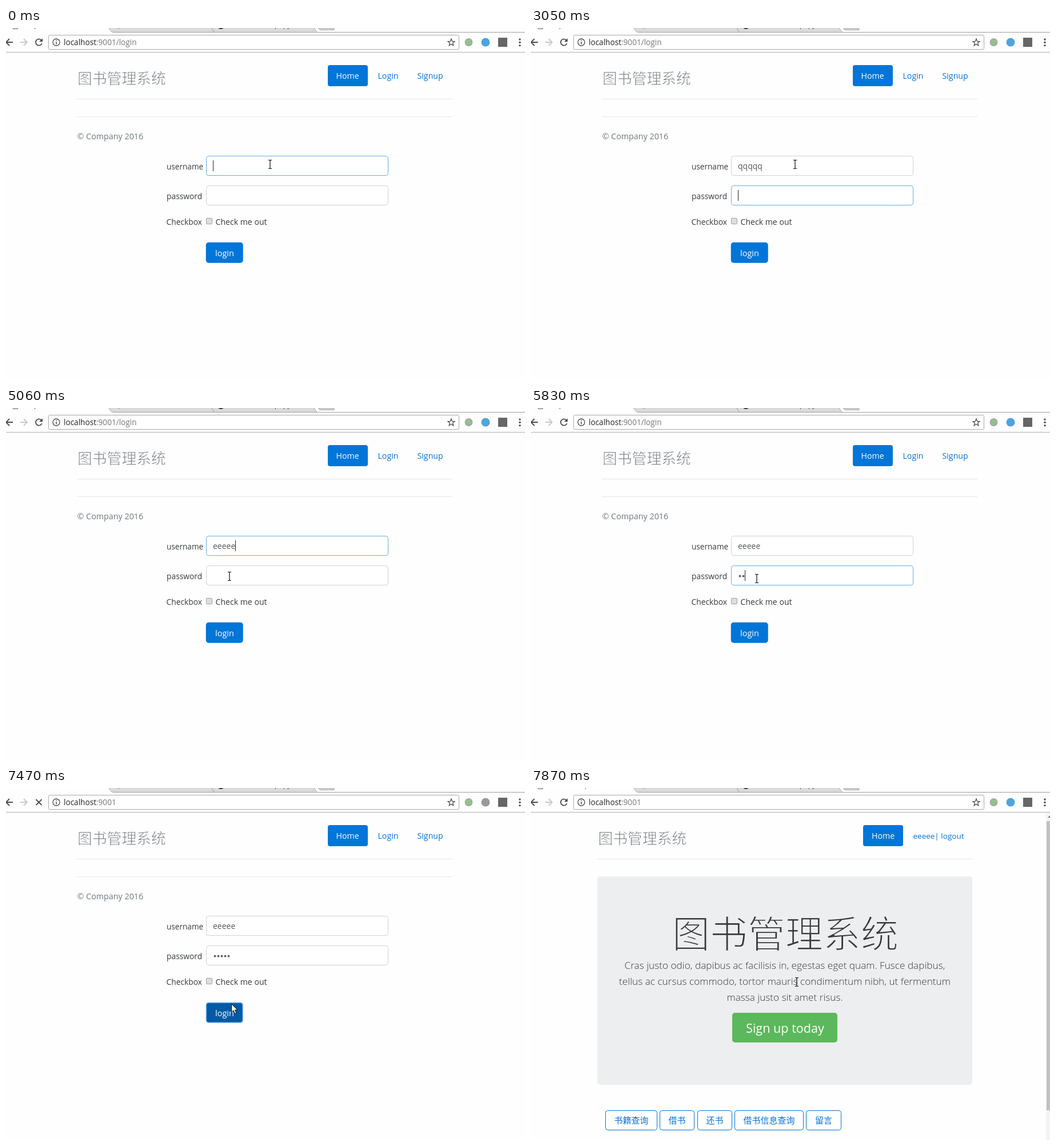
Animation of 908 by 617 pixels, one loop 8000 ms. Source, as an HTML page:

```html
<!DOCTYPE html>
<html lang="zh">
<head>
<meta charset="utf-8">
<style>
  html, body { margin: 0; width: 100%; height: 100%; overflow: hidden; background: #fefefe; }
  svg { display: block; font-family: "Open Sans", "Noto Sans", sans-serif; font-size: 13.8px; }
  .cjk { font-family: "Noto Sans CJK SC", "Noto Sans CJK", sans-serif; }
  /* an outline in the background colour thins the strokes */
  .brand { font-size: 25.8px; fill: #777f86; stroke: #fefefe; stroke-width: .7; }
  .title { font-size: 66px; stroke: #eceeef; stroke-width: 2.2; }
  .ink { fill: #373a3c; }
  .blue { fill: #0275d8; }
  .white { fill: #fff; }
  .mid { text-anchor: middle; }
  .lead { font-size: 17.2px; font-weight: 300; }
  .nav { font-size: 14.2px; }
  .field { fill: #fff; stroke: #d2d2d2; }
  .field.on { stroke: #66afe9; }
  .value { font-size: 14px; fill: #55595c; }
  .icon { fill: none; stroke: #4b4b4b; stroke-width: 1.8; }
  .rule { stroke: #e5e5e5; }
</style>
</head>
<body>
<svg width="908" height="617" viewBox="0 0 908 617">
  <!-- browser tabs -->
  <path d="M180 0L186 7.5H543L539 0Z" fill="#dadada"/>
  <path d="M180 0Q183 7.5 188 7.5H908M360 0L364 7M539 0L544 7" fill="none" stroke="#a0a0a0"/>
  <path d="M546 0L549 3.5H574V0Z" fill="#d0d0d0" stroke="#aaa"/>
  <path id="favicon" d="M12.5 0V1.5H20.5V0" fill="none" stroke="#666"/>
  <circle cx="198" cy="-4" r="5" fill="#62b5e5"/>
  <circle cx="376" cy="-4" r="6" fill="#333"/>
  <g font-size="12" fill="#555">
    <text id="tabText" y="-1">p</text>
    <text x="470" y="-1">p</text><text x="485" y="-1">py</text>
  </g>

  <!-- toolbar -->
  <path d="M0 42.5H908" stroke="#b0b0b0"/>
  <path class="icon" d="M12 25H0M6 19L0 25L6 31"/>
  <path class="icon" d="M25 25H37M31 19L37 25L31 31" style="stroke:#c8c8c8"/>
  <g id="reload">
    <path class="icon" d="M61.5 21A5.6 5.6 0 1 0 62.8 27"/>
    <path d="M64 18V24H58Z" fill="#4b4b4b"/>
  </g>
  <path id="stop" class="icon" d="M52.5 20L62.5 30M62.5 20L52.5 30"/>
  <rect x="74.5" y="12.5" width="718" height="25" rx="2" fill="#fff" stroke="#a9a9a9"/>
  <circle cx="88" cy="25" r="6" class="icon" style="stroke-width:1.3"/>
  <path d="M88 24V28.5M88 21V22.6" stroke="#4b4b4b" stroke-width="1.5"/>
  <text x="101" y="29.5" font-size="13.6" fill="#222">localhost<tspan id="path" fill="#777"></tspan></text>
  <path class="icon" style="stroke-width:1.3" d="M779 19L780.7 23.3L785 23.5L781.6 26.3L782.8 30.7L779 28.2L775.2 30.7L776.4 26.3L773 23.5L777.3 23.3Z"/>
  <circle cx="809.5" cy="25" r="6" fill="#8fc48a" stroke="#a5a5a5" stroke-width="1.8"/>
  <circle id="ext" cx="839" cy="25" r="7.5"/>
  <rect x="861" y="17" width="16" height="16" fill="#666"/>
  <g fill="#4b4b4b"><circle cx="899" cy="20" r="1.7"/><circle cx="899" cy="25.3" r="1.7"/><circle cx="899" cy="30.6" r="1.7"/></g>

  <g id="login">
    <text class="cjk brand" x="125" y="98">图书管理系统</text>
    <rect class="blue" x="563" y="65" width="70" height="37" rx="4"/>
    <g class="nav">
      <text class="white" x="577.5" y="89">Home</text>
      <text class="blue" x="650.5" y="89">Login</text>
      <text class="blue" x="719.5" y="89">Signup</text>
    </g>
    <path class="rule" d="M124 124.5H781M124 155.5H781"/>
    <text x="124.5" y="195" font-size="14.3" fill="#6f767b">© Company 2016</text>
    <g class="ink">
      <text x="281" y="248" font-size="13.6">username</text>
      <text x="281" y="300">password</text>
      <text x="280.5" y="345">Checkbox</text>
      <text x="366.5" y="345" font-size="14.1">Check me out</text>
    </g>
    <rect id="user" class="field" x="350.5" y="224.5" width="318" height="34" rx="4"/>
    <rect id="pass" class="field" x="350.5" y="276.5" width="318" height="34" rx="4"/>
    <rect id="mark" x="362" y="232" width="44" height="19" fill="#3390ff"/>
    <text id="name" class="value" x="362" y="247"></text>
    <g id="dots" fill="#55595c"></g>
    <rect id="caret" width="1" height="19" fill="#222"/>
    <rect x="350.5" y="333.5" width="10" height="10" rx="1.5" fill="#dedede" stroke="#a0a0a0"/>
    <rect id="button" x="350.5" y="376.5" width="63.5" height="34.5" rx="4" stroke-width="1.5"/>
    <text class="white" x="366" y="400" font-size="14.5">login</text>
  </g>

  <g id="home">
    <path d="M901 43H908V617H901Z" fill="#f3f3f3"/>
    <path d="M902 58H908V565H902Z" fill="#c1c1c1"/>
    <path d="M904 52L908 48V52Z" fill="#777"/>
    <text class="cjk brand" x="117.5" y="98">图书管理系统</text>
    <rect class="blue" x="581" y="65" width="70" height="37" rx="4"/>
    <text class="white nav" x="596" y="89">Home</text>
    <text class="blue" x="668.5" y="89" font-size="13.5">eeeee| logout</text>
    <path class="rule" d="M116 124.5H772"/>
    <rect x="116" y="155" width="656" height="365" rx="5" fill="#eceeef"/>
    <text class="cjk title ink mid" x="445" y="280">图书管理系统</text>
    <g class="lead ink mid">
      <text x="444" y="317">Cras justo odio, dapibus ac facilisis in, egestas eget quam. Fusce dapibus,</text>
      <text x="444" y="345">tellus ac cursus commodo, tortor mauris condimentum nibh, ut fermentum</text>
      <text x="444" y="373">massa justo sit amet risus.</text>
    </g>
    <rect x="352" y="394" width="184" height="52" rx="5" fill="#5cb85c"/>
    <text class="white mid" x="444.5" y="429" font-size="21.6">Sign up today</text>
    <g id="links"></g>
  </g>

  <path id="beam" d="M-3 -7.5H-1L0 -6.5L1 -7.5H3M0 -6.5V6.5M-3 7.5H-1L0 6.5L1 7.5H3" fill="none" stroke="#111" stroke-width="1.2"/>
  <path id="arrow" d="M.5 .5V15L4 11.8L6.5 17.5L9 16.4L6.5 11H11Z" fill="#fff" stroke="#111"/>
</svg>
<script>
const $ = id => document.getElementById(id);
const LOOP = 8000, HOVER = 7180, SUBMIT = 7470, HOME = 7600, LOADED = 7750;

// [time, username, dots, focused field, caret: 1 shown, 0 hidden, 2 text selected]
const typing = [
  [0, '', 0, 'user', 1], [400, 'q', 0, 'user', 1], [560, 'qq', 0, 'user', 1],
  [830, 'qqq', 0, 'user', 1], [1110, 'qqqq', 0, 'user', 1], [1640, 'qqqq', 0, 'user', 0],
  [1790, 'qqqqq', 0, 'user', 1], [2070, 'qqqqq', 0, 'pass', 1], [2620, 'qqqqq', 0, 'pass', 0],
  [3050, 'qqqqq', 0, 'pass', 1], [3610, 'qqqqq', 0, 'user', 1], [3730, 'qqqqq', 0, 'user', 2],
  [4130, 'e', 0, 'user', 1], [4400, 'ee', 0, 'user', 1], [4550, 'eee', 0, 'user', 1],
  [4820, 'eeee', 0, 'user', 1], [5060, 'eeeee', 0, 'user', 1], [5370, 'eeeee', 0, 'pass', 1],
  [5680, 'eeeee', 1, 'pass', 1], [5830, 'eeeee', 2, 'pass', 1], [6070, 'eeeee', 3, 'pass', 1],
  [6220, 'eeeee', 4, 'pass', 1], [6750, 'eeeee', 4, 'pass', 0], [6900, 'eeeee', 5, 'pass', 1],
  [7330, 'eeeee', 5, 'pass', 0], [SUBMIT, 'eeeee', 5, '', 0]
];

// [time, x, y] of the pointer
const pointer = [
  [0, 462, 239], [3610, 414, 240], [3730, 320, 241], [3880, 348, 255], [4000, 388, 268],
  [4130, 405, 275], [4280, 401, 283], [4400, 398, 286], [4550, 396, 289], [4680, 394, 291],
  [4820, 393, 293], [4940, 392, 294], [5060, 391, 295], [5680, 391, 297], [5830, 395, 299],
  [5950, 398, 301], [6070, 400, 302], [6900, 402, 316], [7020, 405, 374], [HOVER, 384, 387],
  [7330, 394, 378], [HOME, 427, 358], [7750, 450, 347], [7870, 465, 340]
];

const at = (list, t) => list.findLast(row => row[0] <= t);
const show = (id, on) => $(id).style.display = on ? '' : 'none';

$('dots').innerHTML = [0, 1, 2, 3, 4].map(i => `<circle cx="${365.5 + 6 * i}" cy="294.7" r="1.9"/>`).join('');
$('links').innerHTML = [['书籍查询', 130, 91], ['借书', 225, 61], ['还书', 291, 61], ['借书信息查询', 356, 121], ['留言', 481, 62]]
  .map(([label, x, w]) => `<rect x="${x + .5}" y="565.5" width="${w - 1}" height="34" rx="4" fill="#fff" stroke="#0275d8"/>
    <text class="cjk blue mid" x="${x + w / 2}" y="588" font-size="15">${label}</text>`).join('');

function draw(t) {
  const [, name, dots, focus, caret] = at(typing, t);
  const [, x, y] = at(pointer, t);
  const home = t >= HOME, loading = t >= SUBMIT && t < LOADED;

  show('login', !home);
  show('home', home);
  show('reload', !loading);
  show('stop', loading);
  show('favicon', !loading);
  show('tabText', t < SUBMIT || home);
  $('tabText').setAttribute('x', home ? 94 : 49);
  $('path').textContent = t < SUBMIT ? ':9001/login' : ':9001';
  $('ext').setAttribute('fill', t >= SUBMIT && !home ? '#999' : '#4fa3dc');

  for (const id of ['user', 'pass']) $(id).classList.toggle('on', focus === id);
  $('name').textContent = name;
  $('name').style.fill = caret === 2 ? '#fff' : '';
  show('mark', caret === 2);
  [...$('dots').children].forEach((dot, i) => dot.style.display = i < dots ? '' : 'none');
  show('caret', caret === 1);
  const step = name[0] === 'q' ? 8.75 : 7.8;
  $('caret').setAttribute('x', 362 + Math.round(focus === 'user' ? name.length * step : dots * 6.2));
  $('caret').setAttribute('y', focus === 'user' ? 232 : 284);
  $('button').setAttribute('fill', t < HOVER ? '#0275d8' : '#025aa5');
  $('button').setAttribute('stroke', t < HOVER ? '#0275d8' : t < SUBMIT ? '#01549b' : '#5ea3e6');

  const arrow = t >= HOVER && !home;
  show('arrow', arrow);
  show('beam', !arrow);
  $(arrow ? 'arrow' : 'beam').setAttribute('transform', `translate(${x} ${y})`);
}

const start = performance.now();
function frame() {
  draw((performance.now() - start) % LOOP);
  requestAnimationFrame(frame);
}
frame();
</script>
</body>
</html>
```
